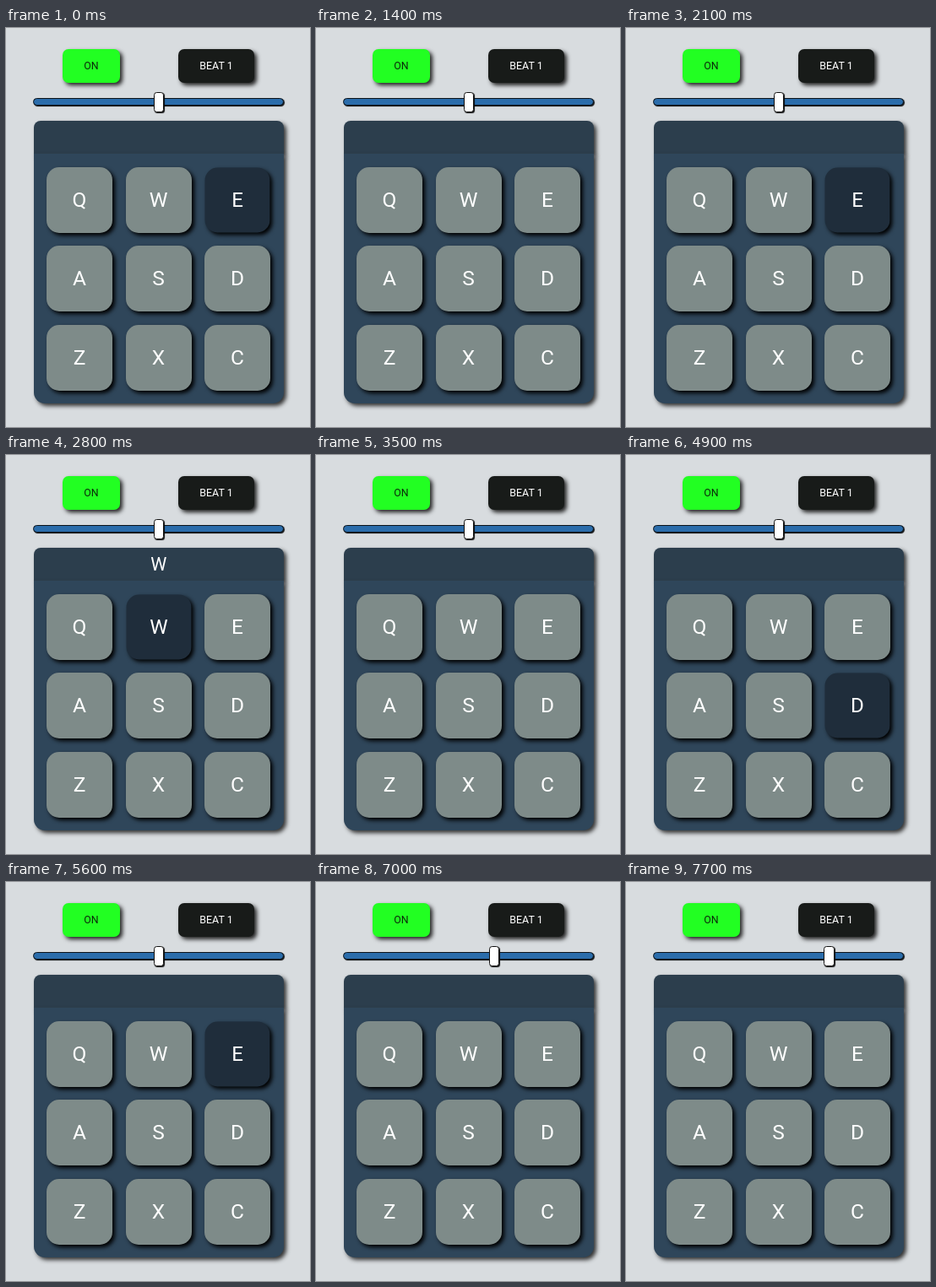
These frames come from a looping animation (360x473 px, 8000 ms). An HTML page:

```html
<!DOCTYPE html>
<html lang="en">
<head>
<meta charset="utf-8">
<title>Drum pad</title>
<style>
  html, body { margin: 0; width: 100%; height: 100%; overflow: hidden; background: #d8dcdf; }
  #stage { position: relative; width: 360px; height: 473px; overflow: hidden; font-family: Roboto, Arial, sans-serif; color: #fff; }
  #stage div { position: absolute; box-sizing: border-box; display: flex; align-items: center; justify-content: center; white-space: pre; }
  .btn { top: 25px; height: 40px; border-radius: 7px; font-size: 12.4px; padding-bottom: 1px; box-shadow: 3px 3px 5px #222; }
  #power { left: 67px; width: 68px; background: #22ff22; color: #0b2a0b; }
  #beat { left: 204px; width: 90px; background: #181b19; }
  #track { left: 32px; top: 83px; width: 297px; height: 8.5px; border: 1.3px solid #0c1218; border-radius: 5px; background: #2b6dab; box-shadow: 1px 1px 1px #0d0d0d; }
  #thumb { left: 174.5px; top: 75.5px; width: 12.5px; height: 24px; border: 1.2px solid #111; border-radius: 3.5px; background: #fff; box-shadow: 1px 1px 1px #0d0d0d; }
  #display { left: 32.5px; top: 109.5px; width: 296.5px; height: 40px; border-radius: 8px 8px 0 0; background: #2c3e4d; font-size: 21.5px; padding-bottom: 1px; box-shadow: 3px 3px 5px #333; }
  #pad { left: 32.5px; top: 149px; width: 296.5px; height: 296px; border-radius: 0 0 13px 13px; background: #2f465a; box-shadow: 3px 3px 5px #333; }
  .key { width: 78px; height: 78px; border-radius: 15px; background: #7e8b89; font-size: 24.5px; padding-bottom: 1px; box-shadow: 3px 3px 5px #000; }
  .key.down { background: #1f2d3b; transform: scale(.985); }
</style>
</head>
<body>
<div id="stage">
  <div id="power" class="btn">ON</div>
  <div id="beat" class="btn">BEAT 1</div>
  <div id="track"></div>
  <div id="thumb"></div>
  <div id="display"></div>
  <div id="pad"></div>
</div>
<script>
const LOOP = 8000, STEP = 700;
// One entry per step; a space means no key is held.
const HELD = "E  EW SDE   ";
const SHOWN = { 4: "W" };
const SLIDE = { 10: 30, 11: 59.5 };

const get = id => document.getElementById(id);
const thumb = get("thumb"), display = get("display");

const keys = [..."QWEASDZXC"].map((letter, i) => {
  const key = document.createElement("div");
  key.className = "key";
  key.textContent = letter;
  key.style.left = 48 + (i % 3) * 93.5 + "px";
  key.style.top = 164.5 + Math.floor(i / 3) * 93.5 + "px";
  get("stage").append(key);
  return key;
});

let current = -1;

function draw(step) {
  for (const key of keys) key.classList.toggle("down", key.textContent === HELD[step]);
  display.textContent = SHOWN[step] || "";
  thumb.style.left = 174.5 + (SLIDE[step] || 0) + "px";
}

function tick() {
  const step = Math.floor((performance.now() % LOOP) / STEP);
  if (step !== current) draw(current = step);
  requestAnimationFrame(tick);
}

tick();
</script>
</body>
</html>
```
